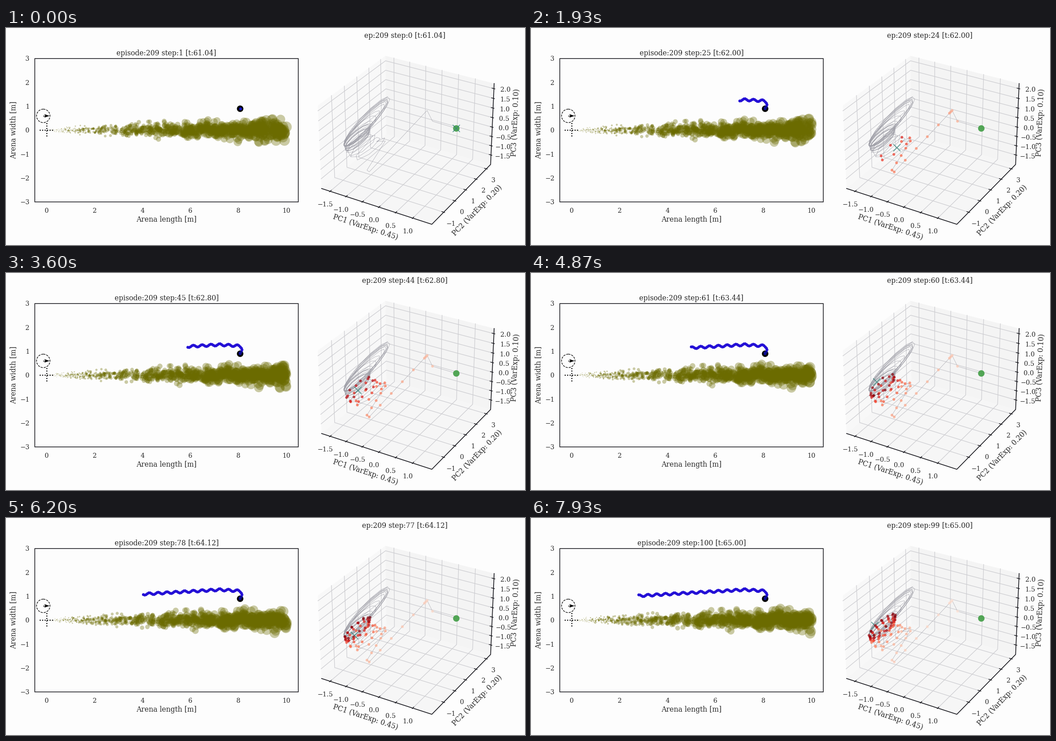
These frames come from a looping animation (1156x484 px, 8000 ms). A matplotlib script:

```python
import numpy as np
import matplotlib.pyplot as plt
from matplotlib.animation import FuncAnimation
from matplotlib.patches import Circle, Polygon, Rectangle

W, H, DPI = 1156, 484, 64
PX = 72 / DPI                      # points per pixel
FRAMES, LOOP_MS, STEPS = 160, 8000, 100
INK, EDGE, BACK = "#262626", "#1a1a20", "#fdfdfd"
LABEL, TICK = 15.68 * PX, 14.36 * PX
DIGIT_DROP = 5.2                   # from a digit's middle to its baseline

plt.rcParams["font.family"] = "DejaVu Serif"
fig = plt.figure(figsize=(W / DPI, H / DPI), dpi=DPI, facecolor=BACK)
ax = fig.add_axes([0, 0, 1, 1])
ax.set_xlim(0, W)
ax.set_ylim(H, 0)
ax.axis("off")


def line(points, color=EDGE, width=1.6, z=2, **kw):
    xs, ys = np.transpose(points)
    return ax.plot(xs, ys, color=color, lw=width * PX, zorder=z, **kw)[0]


def text(x, y, s, size=LABEL, ha="center", va="baseline", angle=0):
    return ax.text(x, y, s, size=size, ha=ha, va=va, rotation=angle,
                   color=INK, zorder=9)


def dots(z, **kw):
    return ax.scatter([], [], zorder=z, **kw)


def area(radius):
    return (2 * radius * PX) ** 2


def number(v, fmt):
    return format(v, fmt).replace("-", "\u2212")


# ---------- arena ----------
LEFT, TOP, RIGHT, BOTTOM = 64.2, 68.2, 651, 387.9
SCALE = (RIGHT - LEFT) / 11
X0, Y0 = LEFT + SCALE / 2, (TOP + BOTTOM) / 2
MID_X = (LEFT + RIGHT) / 2

ax.add_patch(Rectangle((LEFT, TOP), RIGHT - LEFT, BOTTOM - TOP, fill=False,
                       ec=EDGE, lw=1.6 * PX, zorder=6, snap=False))
for v in range(0, 11, 2):
    text(X0 + SCALE * v, 412, str(v), TICK)
for v in range(-3, 4):
    text(52.3, Y0 - SCALE * v + DIGIT_DROP, number(v, "d"), TICK, ha="right")
text(MID_X, 431.5, "Arena length [m]")
text(17, Y0, "Arena width [m]", va="center", angle=90)
arena_title = text(MID_X, 61, "")

# wind indicator and source cross
ax.add_patch(Circle((83, 196), 15, fill=False, ec="k", lw=1.3 * PX,
                    ls=(0, (3.7, 1.6)), zorder=5))
ax.add_patch(Polygon([(97, 196), (85, 192), (88, 196), (85, 200)],
                     color="k", lw=0, zorder=5))
line([(83, 196), (89, 196)], "k", 1.4, 5)
for ends in ([(X0 - 16, Y0), (X0 + 16, Y0)], [(X0, Y0 - 16), (X0, Y0 + 16)]):
    line(ends, "k", 2.3, 5, ls=(0, (1, 1.4)), dash_capstyle="butt")

# puffs ride the wind and spread with the square root of distance
rng = np.random.default_rng(209)
PUFFS, DRIFT = 1150, 0.02
start_x = rng.uniform(-2, 10, PUFFS)
spread = 0.06 * np.clip(rng.normal(size=PUFFS), -2.9, 2.9)
growth = 1.12 * rng.uniform(0.92, 1.08, PUFFS)
plume = dots(3, color=(.42, .42, 0), alpha=.35, lw=0)


def draw_plume(step):
    x = start_x + DRIFT * step
    live = (x > 0.05) & (x < 10.02)
    x = x[live]
    plume.set_offsets(np.c_[X0 + SCALE * x,
                            Y0 - SCALE * spread[live] * np.sqrt(x)])
    plume.set_sizes(area(growth[live] * x + 0.15))


# the walker turns upwind, then weaves steadily
k = np.arange(STEPS)
walk_x = 537 - 3 * k - 15.5 * np.exp(-(k / 2.2) ** 2)
walk_y = (160.3 + 0.058 * (470 - walk_x) + 0.12 * np.maximum(0, walk_x - 476)
          - 2.3 * np.cos(2 * np.pi * (walk_x - 476) / 19.6)
          + 16.3 * np.exp(-(k / 3) ** 2))
walk = np.c_[walk_x, walk_y]
ax.add_patch(Circle(walk[0], 7.2, color="k", lw=0, zorder=5))
trail = dots(5.5, s=area(3.2), lw=0)
trail_colors = np.where(k < 3, "#0a0a90", "#2410d6")

# ---------- 3D box ----------
BOX = np.array([8, 8, 6]) / 7
LIMITS = [(-1.769, 1.551), (-2.03, 3.426), (-2.02, 2.26)]
VIEW_U = np.array([np.sqrt(3) / 2, 0.5, 0])
VIEW_V = np.array([-0.25, np.sqrt(3) / 4, np.sqrt(3) / 2])
VIEW_W = np.array([np.sqrt(3) / 4, -0.75, 0.5])


def project(*p):
    """Unit-cube point to stage pixels, seen from 30 deg up, -60 deg round."""
    q = (np.array(p) - 0.5) * BOX
    zoom = 2462 / (10 - q @ VIEW_W)
    return 894.5 + zoom * (q @ VIEW_U), 241.3 - zoom * (q @ VIEW_V)


def path3d(corners, **kw):
    return line([project(*c) for c in corners], **kw)


SQUARE = [(0, 0), (1, 0), (1, 1), (0, 1)]
for axis, side, shade in [(0, 0, .96), (1, 1, .925), (2, 0, .94)]:
    corners = [project(*np.insert(np.array(c, float), axis, side))
               for c in SQUARE]
    ax.add_patch(Polygon(corners, fc=(shade,) * 3, alpha=.5, lw=0, zorder=0))

OUT, IN = 0.1 / 12, 0.2 / 12
axes3d = [
    (np.arange(-1.5, 1.1, .5), ".1f", (-10, 27.5),
     lambda t: [(t, 0, 0), (t, 1, 0), (t, 1, 1)],
     lambda t: [(t, -OUT, 0), (t, IN, 0)]),
    (np.arange(-1, 4), "d", (14, 24),
     lambda t: [(1, t, 0), (0, t, 0), (0, t, 1)],
     lambda t: [(1 + OUT, t, 0), (1 - IN, t, 0)]),
    (np.arange(-1.5, 2.1, .5), ".1f", (23.5, 1.5),
     lambda t: [(0, 0, t), (0, 1, t), (1, 1, t)],
     lambda t: [(1 + OUT, 1, t), (1 - IN, 1, t)]),
]
for (lo, hi), (ticks, fmt, shift, grid, mark) in zip(LIMITS, axes3d):
    for v in ticks:
        t = (v - lo) / (hi - lo)
        path3d(grid(t), color="#cdcdd1", width=1.3, z=1)
        path3d(mark(t), width=1.5)
        mx, my = project(*mark(t)[0])
        text(mx + shift[0], my + shift[1] + DIGIT_DROP, number(v, fmt), TICK)
path3d([(0, 0, 0), (1, 0, 0), (1, 1, 0), (1, 1, 1)], width=1.7)

for x, y, angle, label in [(801, 444, -18.1, "PC1 (VarExp: 0.45)"),
                           (1050, 406.5, 45.7, "PC2 (VarExp: 0.20)"),
                           (1135, 211, 87.5, "PC3 (VarExp: 0.10)")]:
    text(x, y, label, va="center", angle=angle)
state_title = text(888, 22, "")

# ---------- state trajectory ----------
ENTRY_END, LATE = 15, 99


def tween(t, times, points):
    return np.c_[[np.interp(t, times, c) for c in np.transpose(points)]].T


def entry(t):
    return tween(t, [0, 1, 2, 4, 9, 10, 14],
                 [(1003, 224), (950, 208), (938, 184), (932, 190),
                  (809, 321), (804, 317), (845, 252)])


def orbit(t):
    """Tilted loop between a near end and a far end that climbs late on."""
    t = np.asarray(t, float)
    theta = 2 * np.pi * (t - 60) / 6.53 - 1.75
    late = np.sin(np.pi / 2 * np.clip((t - LATE) / 40, 0, 1))
    climb = late * (0.9 + 0.1 * np.cos(t / 5))
    times = [ENTRY_END, 30, 44, LATE]
    far = tween(t, times, [(846, 246), (822, 240), (808, 232), (812, 212)])
    near = tween(t, times, [(785, 297), (762, 285), (757, 274), (753, 263)])
    far = far + climb[:, None] * (43, -59)
    half = (far - near) / 2
    across = half[:, ::-1] * (-1, 1) / np.hypot(*half.T)[:, None]
    width = 10.5 + 2 * late + 2.5 * np.sin(t / 4)
    return ((far + near) / 2 + half * np.cos(theta)[:, None]
            + across * (width * np.sin(theta))[:, None])


def trajectory(t):
    return np.vstack([entry(t[t < ENTRY_END]), orbit(t[t >= ENTRY_END])])


states = trajectory(k)
whole = np.r_[0:44, 44:160:0.5]
line(trajectory(whole), "#a2a2aa", 0.65, 3)
ax.add_patch(Circle(states[0], 7.2, fc="#45a049", alpha=.92, lw=0, zorder=4))
cross = ax.plot([], [], "x", color="#33857a", ms=15.5 * PX, mew=1.7 * PX,
                alpha=.8, zorder=4.5)[0]
history = dots(5, s=area(2.6), lw=0.8 * PX)
reds = plt.get_cmap("Reds")


def draw_history(step):
    seen = np.arange(1, max(1, step - 1))
    low, high = 0.3 - 0.002 * step, min(1, 0.5 + 0.0095 * step)
    tint = reds(low + (high - low) * seen / max(1, step))
    tint[:, 3] = 0.72
    history.set_offsets(states[seen].reshape(-1, 2))
    history.set_facecolors(tint)
    history.set_edgecolors(tint)
    cross.set_data(*states[step][:, None])


def step_at(frame):
    """The picture ticks 15 times a second; every sixth tick is held."""
    tick = int((frame * LOOP_MS / FRAMES + 35) * 0.015)
    return max(0, (5 * tick + 5) // 6 - 1)


def update(frame):
    step = step_at(frame)
    clock = f"[t:{61.04 + 0.04 * step:.2f}]"
    arena_title.set_text(f"episode:209 step:{step + 1} {clock}")
    state_title.set_text(f"ep:209 step:{step} {clock}")
    draw_plume(step)
    trail.set_offsets(walk[:step + 1])
    trail.set_color(list(trail_colors[:step + 1]) if step else ["#1414cc"])
    draw_history(step)
    return []


anim = FuncAnimation(fig, update, frames=FRAMES, interval=LOOP_MS / FRAMES,
                     init_func=lambda: update(0), repeat=True, repeat_delay=0)
plt.show()
```
